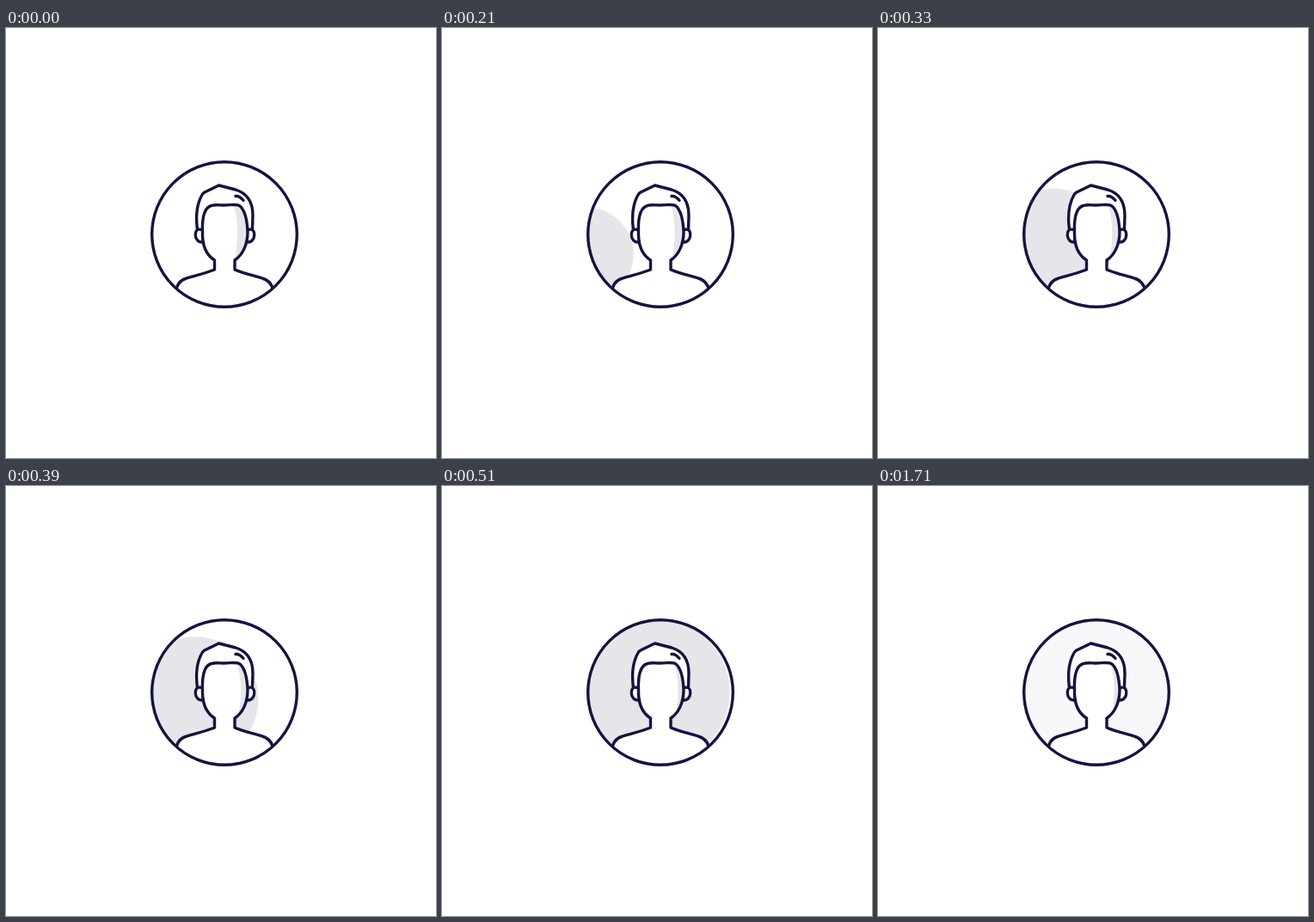
Write an HTML page that moves like this. It is 500 px wide and 500 px high and loops after 1.83 s.

```html
<!DOCTYPE html>
<html lang="en">
<head>
<meta charset="utf-8">
<title>Profile badge</title>
<style>
  html, body { margin: 0; width: 100%; height: 100%; overflow: hidden; background: #fff; }
  svg { display: block; width: 100%; height: 100%; }
  .line { fill: none; stroke: #15143f; stroke-width: 3.4; stroke-linecap: round; stroke-linejoin: round; }
  .tint { fill: #e5e6ea; }
  .white { fill: #fff; }
</style>
</head>
<body>
<svg viewBox="0 0 500 500">
  <defs>
    <clipPath id="badge"><circle cx="254" cy="240" r="84.3"/></clipPath>
    <clipPath id="face">
      <path d="M228.5 237C228 224 229 209 239 206.5C243 205 248 206 254 206C262 206 268 204 272 207C279 213 280.5 226 281 237C281 252 275 264 266 270H242.5C233 264 228 252 228.5 237Z"/>
    </clipPath>
  </defs>

  <g clip-path="url(#badge)">
    <circle id="fill" class="tint"/>
    <path class="white" d="M198.5 302C200 297 203 293 210 291C219 288 230 286 242.5 281V268H266V281C278 286 289 288 298 291C305 293 308 297 310 302V330H198Z"/>
  </g>

  <path class="white" d="M222 234C221 222 221 206 228 194Q229 192 231 191L247.5 183L267 188C280 192 287 202 287 218L286.5 234C289 236 289 248 279 249C276 260 272 266 266 270H242.5C236 266 232 260 230 249C220 249 219 236 222 234Z"/>
  <g clip-path="url(#face)">
    <path id="shade" class="tint" d="M263.5 204C269 216 272 246 265 271H295V204Z"/>
  </g>

  <g class="line">
    <circle cx="254" cy="240" r="84.3"/>
    <path d="M222.3 233C221 222 221 206 228 194Q229 192 231 191L247.5 183L267 188C280 192 287 202 287 218L286.5 233"/>
    <path d="M198.5 302C200 297 203 293 210 291C219 288 230 286 242.5 281V270C233 264 228 252 228.5 237C228 224 229 209 239 206.5C243 205 248 206 254 206C262 206 268 204 272 207C279 213 280.5 226 281 237C281 252 275 264 266 270V281C278 286 289 288 298 291C305 293 308 297 310 302"/>
    <path d="M227.5 234.5C222 233 220 236 220.3 241C220.5 246 224 250 229.5 248.8"/>
    <path d="M281.5 234.5C287 233 289 236 288.7 241C288.5 246 285 250 279.5 248.8"/>
    <path d="M267 195.5C271 195 274 198 276 200.5"/>
  </g>
</svg>

<script>
  const LOOP = 1830, STEP = 30;
  const fill = document.getElementById('fill');
  const shade = document.getElementById('shade');

  // Constant speed up to 450 ms, then slowing to rest at 570 ms.
  function travel(t) {
    const d = Math.min(t, 570) - 450;
    return d < 0 ? d : d - d * d / 240;
  }

  function draw(now) {
    const t = Math.floor(now % LOOP / STEP) * STEP;
    const d = travel(t);
    fill.setAttribute('cx', 238 + 0.2875 * d);
    fill.setAttribute('cy', 243 - 0.083 * d);
    fill.setAttribute('r', 79 + 0.105 * d);
    fill.setAttribute('opacity', t < 90 ? 0 : t < 1710 ? 1 : 0.3);
    const shift = Math.max(0, d + 360) / 420 * 5.5;
    shade.setAttribute('transform', `translate(${shift} 0)`);
  }

  const start = performance.now();
  function tick() {
    draw(performance.now() - start);
    requestAnimationFrame(tick);
  }
  tick();
</script>
</body>
</html>
```
